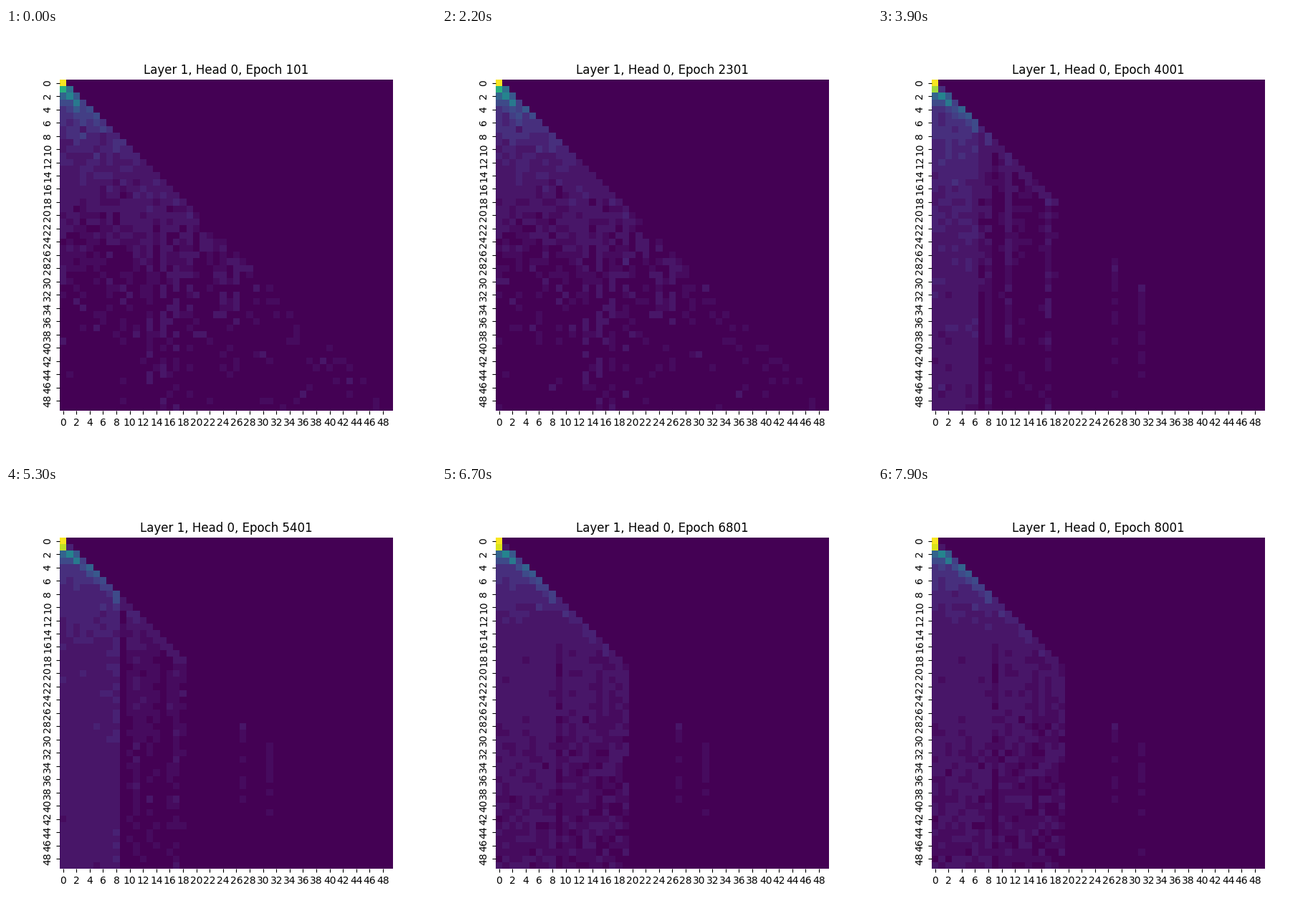
Animation, 600 px wide and 600 px high, one loop 8000 ms. Source, as a matplotlib script:

```python
import numpy as np
import matplotlib.pyplot as plt
from matplotlib.animation import FuncAnimation

SIZE = 50
FRAMES = 80
EARLY_RIDGES = [13, 15, 17, 19, 24, 26]
MID_RIDGES = [8, 11, 17]
TAIL_RIDGES = [27, 31]
DIPS = [9, 15]

rng = np.random.default_rng(12)
noise_a, noise_b = rng.standard_normal((2, SIZE, SIZE))
row, col = np.indices((SIZE, SIZE))
columns = np.arange(SIZE)
causal = col <= row
depth = row / SIZE
near_diag = (row - col <= 1) & (row < 19)


def track(i, *values, keys=(24, 37, 53, 67)):
    """Value at step i on a line through the training stages."""
    return np.interp(i, keys, values)


def fill(width):
    """1 for columns left of width, 0 to the right, with a partial edge."""
    return np.clip(width - columns, 0, 1)


def on(cols):
    return np.isin(columns, cols)


def column_weights(i):
    base = track(i, 0, 0, -.5, -.7)
    inner = track(i, 0, 1.6, 1.7, 1.05)
    outer = track(i, 0, .55, 1, .9)
    left = fill(track(i, 7, 7, 9, 9))
    right = fill(track(i, 19, 19, 19, 20))
    w = base + (outer - base) * right + (inner - outer) * left
    w += track(i, 0, .5, .2, 0) * on(MID_RIDGES)
    w -= track(i, 0, .2, .35, .2) * on(DIPS)
    w[TAIL_RIDGES] = .62 * inner
    return w


def logits(i):
    late = track(i, 0, 1, 1, 1)
    angle = .02 * i
    noise = np.cos(angle) * noise_a + np.sin(angle) * noise_b
    z = column_weights(i) + track(i, .3, .2, .13, .16) * (.6 + .7 * depth) * noise
    z += (1 - late) * depth * (.45 * on(EARLY_RIDGES) + .2 * (columns > 34))
    z += (.1 + .4 * late) * near_diag
    return z


def attention(i):
    e = np.exp(logits(i)) * causal
    a = e / e.sum(axis=1, keepdims=True)
    sink = track(i, .62, .84, .9, .94)
    a[1, :2] = sink, 1 - sink
    a[2, :3] = .3, .46, .27
    a[3, :4] = .22, .22, .42, .16
    # coarse colour steps
    return np.select([a < .032, a < .042, a < .08], [0, .03, .055],
                     np.round(a / .045) * .045)


fig, ax = plt.subplots(figsize=(6, 6), dpi=100)
mesh = ax.pcolormesh(attention(0), cmap="viridis", vmin=0, vmax=1)
ax.set(xlim=(0, SIZE), ylim=(SIZE, 0))
ax.spines[:].set_visible(False)
ticks = np.arange(0, SIZE, 2)
ax.set_xticks(ticks + .5, ticks)
ax.set_yticks(ticks + .5, ticks, rotation="vertical", va="center")
title = ax.set_title("")


def update(i):
    mesh.set_array(attention(i))
    title.set_text(f"Layer 1, Head 0, Epoch {101 + 100 * i}")
    return mesh, title


anim = FuncAnimation(fig, update, frames=FRAMES, interval=100, repeat=True)
plt.show()
```
